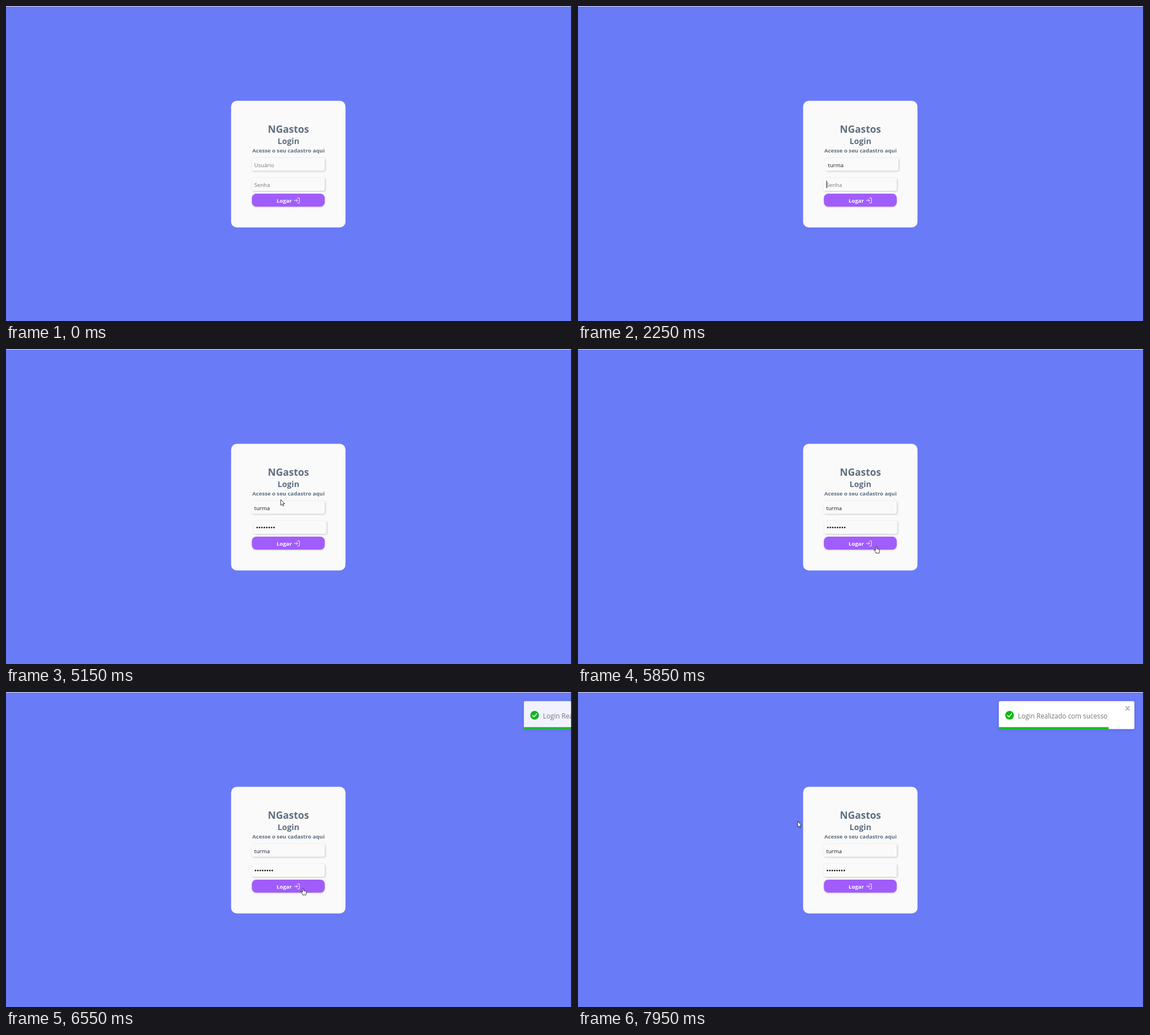
Recreate the animation shown at these times as an HTML page. Size 1002 by 559 pixels, loop 8 s.

```html
<!DOCTYPE html>
<html lang="pt-BR">
<head>
<meta charset="utf-8">
<title>Login</title>
<style>
  html, body { margin: 0; width: 100%; height: 100%; overflow: hidden; background: #6a7bf8; }
  svg { display: block; width: 1002px; height: 559px; }
  text { font-family: "Open Sans", "Noto Sans", sans-serif; font-size: 9.65px; }
  .head { font-weight: 700; fill: #5f6f81; text-anchor: middle; }
  .field rect.box { fill: #fafafa; filter: drop-shadow(1px 1px 1.5px rgba(0, 0, 0, .22)); }
  .hint { fill: #777; }
  .typed { fill: #111827; }
  .button { fill: #a15dfc; filter: drop-shadow(0 1px 1px rgba(0, 0, 0, .22)); }
  .toast { fill: #fff; filter: drop-shadow(0 1px 3px rgba(0, 0, 0, .14)); }
  .line { fill: none; stroke-linecap: round; stroke-linejoin: round; }
  .pointer path { fill: #fff; stroke: #111; stroke-width: .8; stroke-linejoin: round; }
</style>
</head>
<body>
<svg viewBox="0 0 1002 559">
  <rect width="1002" height="559" fill="#6a7bf8"/>
  <rect width="1001" height="1" fill="#e2dce0"/>

  <rect id="card" x="398.5" width="202.5" rx="10" fill="#fafafa"/>
  <g id="form">
    <text class="head" x="500" y="225" style="font-size:17.4px">NGastos</text>
    <text class="head" x="500" y="245.2" style="font-size:14.2px">Login</text>
    <text class="head" x="500" y="260">Acesse o seu cadastro aqui</text>

    <g class="field" id="user">
      <rect class="box" x="435" y="269.5" width="129.5" height="23" rx="3.5"/>
      <text class="hint" x="439.5" y="285.6">Usuário</text>
      <text class="typed" x="439.5" y="285.6"></text>
      <rect class="caret" y="275" width="1" height="13" fill="#111"/>
    </g>
    <g class="field" id="pass">
      <rect class="box" x="435" y="305" width="129.5" height="23" rx="3.5"/>
      <text class="hint" x="439.5" y="320.6">Senha</text>
      <g class="dots" fill="#111"></g>
      <rect class="caret" y="310" width="1" height="13" fill="#111"/>
    </g>

    <rect class="button" x="435.3" y="333" width="129" height="23" rx="8"/>
    <text x="479" y="348.7" fill="#fff" font-weight="700">Logar</text>
    <g class="line" transform="translate(509.2 338.5) scale(.051)" stroke="#fff" stroke-width="18">
      <path d="M24 128H136M94 86l42 42-42 42M136 40h56a8 8 0 0 1 8 8v160a8 8 0 0 1-8 8h-56"/>
    </g>
    <path id="spinner" class="line" d="M-8 0A8 8 0 0 1 0-8" stroke="#a15dfc" stroke-width="2" style="stroke-linecap:butt"/>
  </g>

  <g id="toast">
    <rect class="toast" x="745" y="16.3" width="240" height="49.5" rx="2.6"/>
    <rect id="bar" x="745" y="62.4" height="3.4" fill="#07bc0c"/>
    <circle cx="764" cy="41.3" r="7.7" fill="#07bc0c"/>
    <path class="line" d="M760.4 41.6l2.6 2.6 4.8-5.6" stroke="#fff" stroke-width="1.5"/>
    <text x="778.8" y="46.6" fill="#757575" style="font-size:11.75px">Login Realizado com sucesso</text>
    <path class="line" d="M969.8 25.8l6.4 6.4M976.2 25.8l-6.4 6.4" stroke="#999" stroke-width="1.4"/>
  </g>

  <g class="pointer" id="pointer">
    <path id="arrow" d="M.4.4V10.4L2.7 8.3 4.3 11.8 5.9 11.1 4.4 7.6H7.5Z"/>
    <path id="hand" d="M-1 .8Q0-.6 1 .8V4.6l3.9.8q1.2.3 1.1 1.6l-.8 3.6v1.6h-6v-1.3l-3-3.6q-.4-1.4 1-1l1.8 1.1Z"/>
  </g>
  <rect x="1000.5" width="1.5" height="559" fill="#0c0c12"/>
</svg>
<script>
const LOOP = 8000, LEFT = 439.5, DOT = 4.25, NAME = 'turma';
const $ = s => document.querySelector(s);
const set = (el, attrs) => { for (const k in attrs) el.setAttribute(k, attrs[k]); };
const show = (el, on) => { el.style.display = on ? '' : 'none'; };
const within = (t, a, b) => t >= a && t < b;

const userKeys = [1700, 1850, 1950, 2050, 2100];
const passKeys = [3000, 3150, 3350, 3550, 3700, 3900, 4150, 4300];
const focus = { user: [1000, 2250], pass: [2250, 5550] };
const busy = [6200, 6400];
const toastStart = 6320, toastTime = 700, barStart = 7000;

// time, x, y of the pointer tip
const visits = [
  [[150, 81, 24], [300, 205, 116], [450, 325, 190], [600, 428, 246], [700, 466, 267], [750, 482, 282]],
  [[5150, 486, 267], [5200, 486, 263], [5350, 486, 264], [5450, 500, 298], [5550, 528, 350],
   [6400, 528, 350], [6550, 526, 348], [6750, 515, 336], [6850, 503, 312], [7050, 455, 277],
   [7300, 414, 248], [7600, 392, 238], [7950, 388.5, 229.3], [8000, 388.5, 229]]
];
const bounce = [[0, 1956], [.6, -16.3], [.75, 6.5], [.9, -3.3], [1, 0]];

function bezier(x1, y1, x2, y2) {
  const at = (a, b, u) => 3 * a * u * (1 - u) ** 2 + 3 * b * u * u * (1 - u) + u ** 3;
  return x => {
    if (x <= 0) return 0;
    if (x >= 1) return 1;
    let lo = 0, hi = 1;
    for (let i = 0; i < 24; i++) {
      const mid = (lo + hi) / 2;
      if (at(x1, x2, mid) < x) lo = mid; else hi = mid;
    }
    return at(y1, y2, lo);
  };
}
const ease = bezier(.25, .1, .25, 1);
const easeOut = bezier(.215, .61, .355, 1);

function follow(steps, t, curve = u => u) {
  if (t >= steps.at(-1)[0]) return steps.at(-1).slice(1);
  const i = steps.findIndex(s => s[0] > t);
  const a = steps[i - 1], b = steps[i];
  const u = curve((t - a[0]) / (b[0] - a[0]));
  return a.slice(1).map((v, k) => v + (b[k + 1] - v) * u);
}

for (let i = 0; i < passKeys.length; i++) {
  const dot = document.createElementNS('http://www.w3.org/2000/svg', 'circle');
  set(dot, { cx: LEFT + DOT * (i + .5), cy: 316.8, r: 1.4 });
  $('.dots').append(dot);
}

function drawField(id, t, count, keys, width) {
  const box = $('#' + id), [on, off] = focus[id];
  const shift = 3 * (ease((t - on) / 700) - ease((t - off) / 700));
  set(box, { transform: `translate(${shift} 0)` });
  show(box.querySelector('.hint'), !count);
  const last = count ? keys[count - 1] : on;
  const caret = box.querySelector('.caret');
  set(caret, { x: LEFT + width });
  show(caret, within(t, on, off) && Math.floor((t - last) / 450) % 2 === 0);
}

function drawPointer(t, lift) {
  const path = visits.find(v => within(t, v[0][0], v.at(-1)[0]));
  show($('#pointer'), path);
  if (!path) return;
  const [x, y] = follow(path, t);
  const over = (top, bottom) => within(x, 435, 565) && within(y - lift, top, bottom);
  const overButton = over(333, 356);
  const overField = over(269.5, 292.5) || over(305, 328);
  set($('#pointer'), { transform: `translate(${x} ${y})` });
  show($('#arrow'), !overButton && !overField);
  show($('#hand'), overButton);
}

function drawToast(t) {
  const u = (t - toastStart) / toastTime;
  show($('#toast'), u >= 0);
  if (u < 0) return;
  set($('#toast'), {
    transform: `translate(${follow(bounce, u, easeOut)[0]} 0)`,
    opacity: easeOut(u / .6)
  });
  set($('#bar'), { width: 240 * (1 - Math.max(0, t - barStart) / 5000) });
}

function draw(t) {
  const loading = within(t, ...busy), lift = loading ? -12.3 : 0;
  set($('#card'), { y: 168.2 + lift, height: 224.8 - 2 * lift });
  set($('#form'), { transform: `translate(0 ${lift})` });
  show($('#spinner'), loading);
  set($('#spinner'), { transform: `translate(446 372.3) rotate(${(t - 6350) * .36})` });

  const typed = keys => keys.filter(k => k <= t).length;
  const letters = typed(userKeys), dots = typed(passKeys);
  const name = $('#user .typed');
  name.textContent = NAME.slice(0, letters);
  drawField('user', t, letters, userKeys, letters ? name.getComputedTextLength() + .3 : .8);
  [...$('.dots').children].forEach((d, i) => show(d, i < dots));
  drawField('pass', t, dots, passKeys, dots * DOT + .3);

  drawToast(t);
  drawPointer(t, lift);
}

const start = performance.now();
function tick() {
  draw((performance.now() - start) % LOOP);
  requestAnimationFrame(tick);
}
tick();
</script>
</body>
</html>
```
